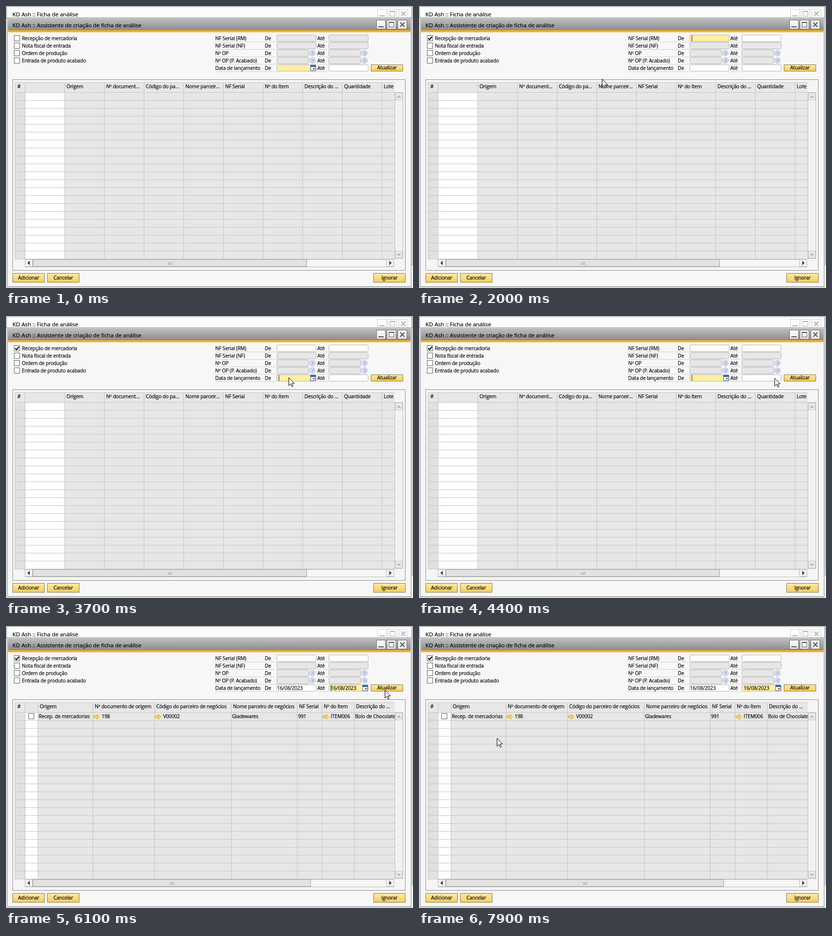
An HTML page for the animation above (8 s loop, 821 by 569 pixels).

```html
<!DOCTYPE html>
<html lang="pt-BR">
<head>
<meta charset="utf-8">
<title>Ficha de análise</title>
<style>
html, body { margin: 0; width: 100%; height: 100%; overflow: hidden; background: #f7f7f7; }
svg { display: block; width: 821px; height: 569px; }
text { font: 10px "Open Sans", "Noto Sans", sans-serif; letter-spacing: -.16px; fill: #000; stroke: #000; stroke-width: .18px; white-space: pre; }
text.title { font-size: 11.5px; letter-spacing: -.1px; }
text.mid { text-anchor: middle; }
</style>
</head>
<body>
<svg id="stage" viewBox="0 0 821 569" xmlns="http://www.w3.org/2000/svg">
  <defs>
    <linearGradient id="bar" x2="0" y2="1"><stop stop-color="#bebebe"/><stop offset="1" stop-color="#8c8c8c"/></linearGradient>
    <linearGradient id="gold" x2="0" y2="1"><stop stop-color="#fdebaa"/><stop offset="1" stop-color="#f2cd59"/></linearGradient>
    <linearGradient id="pale" x2="0" y2="1"><stop stop-color="#fff"/><stop offset="1" stop-color="#e6e6e6"/></linearGradient>
    <clipPath id="grid"><rect x="18" y="154" width="766" height="357"/></clipPath>
  </defs>
</svg>
<script>
const NS = 'http://www.w3.org/2000/svg';
const stage = document.getElementById('stage');

function add(parent, tag, attrs, content) {
  const el = document.createElementNS(NS, tag);
  for (const k in attrs) el.setAttribute(k, attrs[k]);
  if (content !== undefined) el.textContent = content;
  parent.appendChild(el);
  return el;
}
const group = (p = stage, attrs = {}) => add(p, 'g', attrs);
const fill = (p, x, y, width, height, color) => add(p, 'rect', { x, y, width, height, fill: color });
const box = (p, x, y, w, h, color, stroke, rx = 0) =>
  add(p, 'rect', { x: x + .5, y: y + .5, width: w - 1, height: h - 1, fill: color, stroke, rx });
const path = (p, d, color, stroke = 'none', width = 1) =>
  add(p, 'path', { d, fill: color, stroke, 'stroke-width': width });
const label = (p, x, y, str, cls = '') => add(p, 'text', { x, y, class: cls }, str);
const show = (el, on) => el.setAttribute('visibility', on ? 'inherit' : 'hidden');

function windowButtons(x, y, color, stroke, ink) {
  [0, 21, 43].forEach(dx => box(stage, x + dx, y, 19, 19, color, stroke));
  fill(stage, x + 4, y + 13, 11, 2, ink);
  box(stage, x + 25, y + 4, 11, 11, 'none', ink);
  fill(stage, x + 25, y + 4, 11, 2, ink);
  path(stage, `M${x + 48} ${y + 5}l9 9m0 -9l-9 9`, 'none', ink, 2);
}

function button(x, y, w, h, str) {
  box(stage, x, y, w, h, 'url(#gold)', '#8b7b46');
  label(stage, x + w / 2, y + h / 2 + 3, str, 'mid');
}

const checkbox = (p, x, y) => box(p, x, y, 12, 12, '#fff', '#606468');

const linkArrow = (p, x, y) =>
  path(p, `M${x + .5} ${y - 2}h6v-3l5 5l-5 5v-3h-6z`, '#ffdc4e', '#d79a16');

function calendar(p, x, y) {
  box(p, x, y, 11, 12, '#fff', '#2f66b0');
  fill(p, x, y, 11, 4, '#2f66b0');
  fill(p, x + 5, y + 6, 4, 3, '#e0564c');
}

// Windows
fill(stage, 0, 0, 821, 569, '#f7f7f7');
box(stage, 0, 0, 820, 568, '#fbfbfb', '#c4c4c4');
box(stage, 1, 1, 818, 24, '#fcfcfc', '#b0b0b0');
fill(stage, 819, 0, 1, 524, '#8e8e8e');
fill(stage, 819, 524, 2, 45, '#f7f7f7');
label(stage, 13, 21, 'KD Ash :: Ficha de análise', 'title');
windowButtons(749, 6, '#fdfdfd', '#d0d0d0', '#b2b2b2');
box(stage, 2, 23, 816, 544, '#f7f7f7', '#a2a2a2');
box(stage, 3, 24, 814, 542, '#f7f7f7', '#d6d6d6');
fill(stage, 4, 25, 812, 24, 'url(#bar)');
fill(stage, 4, 49, 812, 4, '#fbb31a');
label(stage, 13, 43, 'KD Ash :: Assistente de criação de ficha de análise', 'title');
windowButtons(747, 28, 'url(#pale)', '#707070', '#555');

// Filters
['Recepção de mercadoria', 'Nota fiscal de entrada', 'Ordem de produção', 'Entrada de produto acabado']
  .forEach((str, i) => {
    checkbox(stage, 16, 59 + i * 15);
    label(stage, 32, 69 + i * 15, str);
  });
const tick = path(stage, 'M18.5 65l2.7 3l5 -6', 'none', '#000', 2);

const SIDES = [546, 651];
const fields = ['NF Serial (RM)', 'NF Serial (NF)', 'Nº OP', 'Nº OP (P. Acabado)', 'Data de lançamento']
  .map((str, i) => {
    const y = 58 + i * 15, lookup = i === 2 || i === 3;
    fill(stage, 422, y + 14, 124, 1, '#d2d2d2');
    fill(stage, 628, y + 14, 23, 1, '#d2d2d2');
    [[422, str], [522, 'De'], [628, 'Até']].forEach(([x, s]) => label(stage, x, y + 11, s));
    return SIDES.map(x => {
      const rect = box(stage, x, y, lookup ? 65 : 80, 14, '#e7e7e7', '#b4b4b4', 2);
      if (lookup) {
        add(stage, 'circle', { cx: x + 72, cy: y + 7, r: 5.5, fill: '#e6ebf7', stroke: '#98a5cf' });
        [-2, 0, 2].forEach(d => fill(stage, x + 70, y + 6.5 + d, 5, 1, '#8b99c8'));
      }
      return rect;
    });
  });
button(736, 118, 65, 14, 'Atualizar');

const dates = SIDES.map(x => {
  const icon = group();
  calendar(icon, x + 68, 119);
  return { icon, text: label(stage, x, 129, '') };
});
const caret = fill(stage, 0, 0, 1, 12, '#1c1c50');

// Tables
box(stage, 13, 148, 793, 386, '#f5f5f5', '#8e8e8e');

function table(cols, heads, thumb) {
  const g = group(), c = group(g, { 'clip-path': 'url(#grid)' });
  fill(c, 18, 154, 766, 357, '#e7e7e7');
  fill(c, 18, 175, 20, 336, '#e1e1e1');
  fill(c, cols[0], 175, cols[1] - cols[0], 336, '#fff');
  for (let y = 174; y <= 510; y += 16) fill(c, 18, y, 766, 1, '#c6c6c6');
  [18, ...cols].forEach(x => fill(c, x, 154, 1, 357, '#c3c3c3'));
  fill(c, 18, 154, 766, 1, '#c6c6c6');
  label(c, 23, 166, '#');
  heads.forEach((str, i) => label(c, cols[i + 1] + 4, 166, str));
  box(g, 38, 511, 745, 16, '#f6f6f6', '#bcbcbc');
  box(g, 54, 511, thumb, 15, '#e2e2e2', '#a2a2a2');
  for (let i = 0; i < 6; i++)
    fill(g, Math.round(54 + thumb / 2) - 4 + i % 3 * 3, 517 + (i > 2) * 3, 2, 2, '#aaa');
  return { g, c };
}

const empty = table(Array.from({ length: 10 }, (_, i) => 38 + 80 * i),
  ['Origem', 'Nº document...', 'Código do pa...', 'Nome parceir...', 'NF Serial',
   'Nº do Item', 'Descrição do ...', 'Quantidade', 'Lote'], 553);

const cols = [38, 64, 175, 299, 454, 587, 637, 702];
const loaded = table(cols,
  ['Origem', 'Nº documento de origem', 'Código do parceiro de negócios',
   'Nome parceiro de negócios', 'NF Serial', 'Nº do Item', 'Descrição do ...'], 561);
checkbox(loaded.c, 45, 176);
['Recep. de mercadorias', '>198', '>V00002', 'Gladewares', '991', '>ITEM006', 'Bolo de Chocolate']
  .forEach((str, i) => {
    const x = cols[i + 1] + 2, linked = str[0] === '>';
    if (linked) linkArrow(loaded.c, x, 183);
    label(loaded.c, x + (linked ? 16 : 0), 186, str.replace('>', ''));
  });

// Scroll bars
box(stage, 784, 174, 17, 336, '#f2f2f2', '#bcbcbc');
[175, 494].forEach(y => box(stage, 785, y, 15, 15, '#e9e9e9', '#c8c8c8'));
path(stage, 'M788 185h9l-4.5 -5z', '#b8b8b8');
path(stage, 'M788 500h9l-4.5 5z', '#b8b8b8');
[38, 767].forEach(x => box(stage, x, 511, 16, 15, '#f2f2f2', '#bcbcbc'));
path(stage, 'M48 514v9l-5 -4.5z', '#444');
path(stage, 'M773 514v9l5 -4.5z', '#444');

button(13, 539, 65, 19, 'Adicionar');
button(83, 539, 65, 19, 'Cancelar');
button(741, 539, 65, 19, 'Ignorar');

const pointer = path(stage, 'M.5 .5V16.5L4.3 12.9L6.7 18.5L9 17.5L6.6 12H11.5Z', '#fff', '#000');

// Pointer glides: begin, end, x, y, downward bow
const glides = [
  [400, 900, 28, 68], [1000, 1200, 21, 68], [1500, 1700, 33, 75],
  [1800, 2000, 369, 147], [2000, 2500, 575, 124, 12], [2700, 2900, 570, 124],
  [3900, 4400, 717, 125, 31], [4400, 4700, 747, 126], [4800, 5100, 768, 131],
  [5200, 5500, 764, 129], [6300, 6400, 763, 131], [7400, 7900, 157, 226, 70]
];
const ease = p => 1 - (1 - p) ** 2;

function pointerAt(t) {
  let x = 36, y = -10;
  for (const [begin, end, tx, ty, bow = 0] of glides) {
    if (t < begin) break;
    const s = ease(Math.min(1, (t - begin) / (end - begin)));
    x += (tx - x) * s;
    y += (ty - y) * s + 4 * bow * s * (1 - s);
  }
  return [Math.round(x), Math.round(y)];
}

// Input events: time and what changes; each one restarts the caret blink
const DAY = '16/08/2023', CHECKED = 1500, FOCUSED = 1900, LOADED = 6100;
const events = [
  [0, { row: 4, side: 0, days: ['', ''] }],
  [FOCUSED, { row: 0 }],
  [3600, { row: 4 }],
  [4000, {}],
  [4600, { days: ['1', ''] }],
  [4700, { days: ['16', ''] }],
  [4900, { side: 1, days: [DAY, ''] }],
  [5100, { days: [DAY, '1'] }],
  [5300, { days: [DAY, '16'] }],
  [5700, { days: [DAY, DAY] }],
  [LOADED, {}]
];

function draw(t) {
  const past = events.filter(e => e[0] <= t);
  const { row, side, days } = Object.assign({}, ...past.map(e => e[1]));
  const since = t - past[past.length - 1][0];
  show(tick, t >= CHECKED);
  [0, 4].forEach(r => fields[r].forEach((f, s) => {
    const active = r === row && s === side, open = r === 4 || t >= FOCUSED;
    f.setAttribute('fill', active ? '#ffefa0' : open ? '#fff' : '#e7e7e7');
  }));
  dates.forEach(({ icon, text }, s) => {
    const active = row === 4 && s === side;
    show(icon, active);
    text.setAttribute('x', SIDES[s] + (active ? 4 : 1));
    if (text.textContent !== days[s]) text.textContent = days[s];
  });
  const typed = row === 4 && days[side] !== DAY ? days[side].length : 0;
  caret.setAttribute('x', SIDES[side] + 4 + typed * 5);
  caret.setAttribute('y', 59 + row * 15);
  show(caret, t >= FOCUSED && since % 1000 < 500);
  show(empty.g, t < LOADED);
  show(loaded.g, t >= LOADED);
  show(pointer, t >= 500);
  pointer.setAttribute('transform', `translate(${pointerAt(t)})`);
}

// Everything advances in ticks of 100 ms
const start = performance.now();
function frame() {
  const t = (performance.now() - start) % 8000;
  draw(Math.floor(t / 100) * 100);
  requestAnimationFrame(frame);
}
frame();
</script>
</body>
</html>
```
